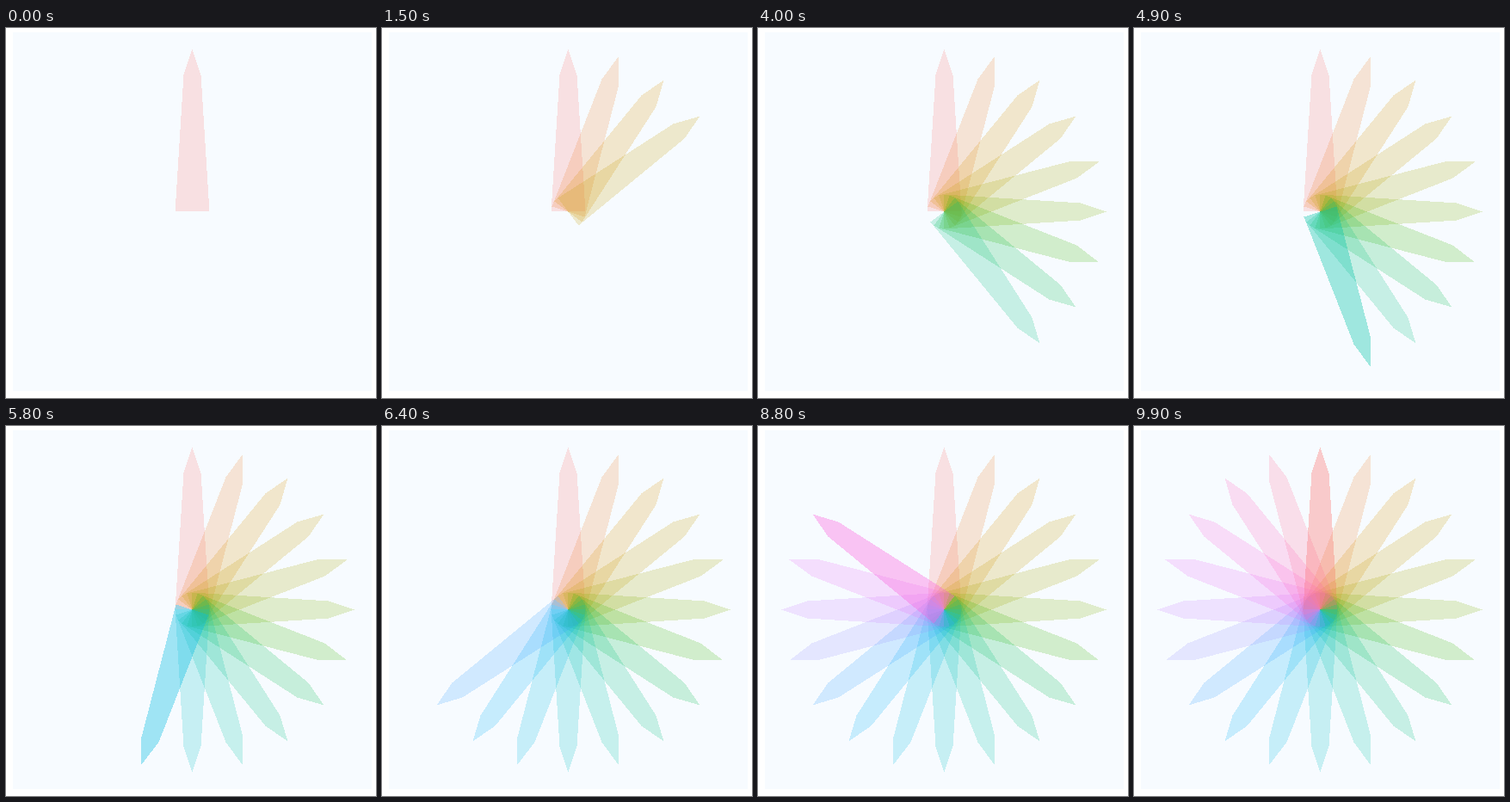
An HTML page with a canvas for the animation above (10000 ms loop, 430x430 px).

```html
<!DOCTYPE html>
<html lang="en">
<head>
<meta charset="utf-8">
<title>Petal wheel</title>
<style>
  html, body { margin: 0; width: 100%; height: 100%; overflow: hidden; background: #fff; }
  canvas { display: block; width: 430px; height: 430px; }
</style>
</head>
<body>
<canvas id="stage" width="430" height="430"></canvas>
<script>
const ctx = document.getElementById('stage').getContext('2d');
const LOOP = 10000, COUNT = 20;
const CX = 216.375, CY = 213.625, R = 189.2;
const COLORS = ('F8766D EA8331 D89000 C09B00 A3A500 7CAE00 39B600 00BB4E 00BF7D 00C1A3 ' +
  '00BFC4 00BAE0 00B0F6 35A2FF 9590FF C77CFF E76BF3 FA62DB FF62BC FF6A98').split(' ');

// Petal outline as [across, outward] in units of the radius
const SHAPE = [[-0.105, 0], [-0.0545, 0.84], [0, 1], [0.0545, 0.84], [0.105, 0]];

// Crisp, non-antialiased fill of a convex outline: one [x, y, width] per row
function scan(points) {
  const ys = points.map(p => p[1]);
  const rows = [];
  for (let y = Math.min(...ys); y < Math.max(...ys); y++) {
    const xs = [];
    points.forEach(([x0, y0], i) => {
      const [x1, y1] = points[(i + 1) % points.length];
      if (y >= Math.min(y0, y1) && y < Math.max(y0, y1)) {
        xs.push(x0 + (x1 - x0) * (y - y0) / (y1 - y0));
      }
    });
    const left = Math.ceil(Math.min(...xs)), right = Math.ceil(Math.max(...xs));
    if (right > left) rows.push([left, y, right - left]);
  }
  return rows;
}

const petals = COLORS.map((color, i) => {
  const a = i * 2 * Math.PI / COUNT, s = Math.sin(a), c = Math.cos(a);
  const points = SHAPE.map(([u, v]) => [
    Math.floor(CX + R * (u * c + v * s)),
    Math.floor(CY + R * (u * s - v * c))
  ]);
  return { color: '#' + color, rows: scan(points) };
});

function drawPetal(i) {
  const { color, rows } = petals[i % COUNT];
  ctx.fillStyle = color;
  for (const [x, y, w] of rows) ctx.fillRect(x, y, w, 1);
}

const startOf = k => k * 500 - (k > 10 ? 100 : 0);

function render(t) {
  let k = 0;
  while (k < COUNT && startOf(k + 1) <= t) k++;
  // Each petal leaves its trail just before the next one appears
  const lead = k === 0 ? 200 : 100;
  const marked = k < COUNT && t >= startOf(k + 1) - lead ? k + 1 : k;

  ctx.globalAlpha = 1;
  ctx.fillStyle = '#fff';
  ctx.fillRect(0, 0, 430, 430);
  ctx.fillStyle = '#f7fbff';
  ctx.fillRect(8, 5, 417, 417);
  ctx.globalAlpha = 0.2;
  for (let i = 0; i < marked; i++) drawPetal(i);
  drawPetal(k);
}

const begin = performance.now();
function tick() {
  render((performance.now() - begin) % LOOP);
  requestAnimationFrame(tick);
}
tick();
</script>
</body>
</html>
```
